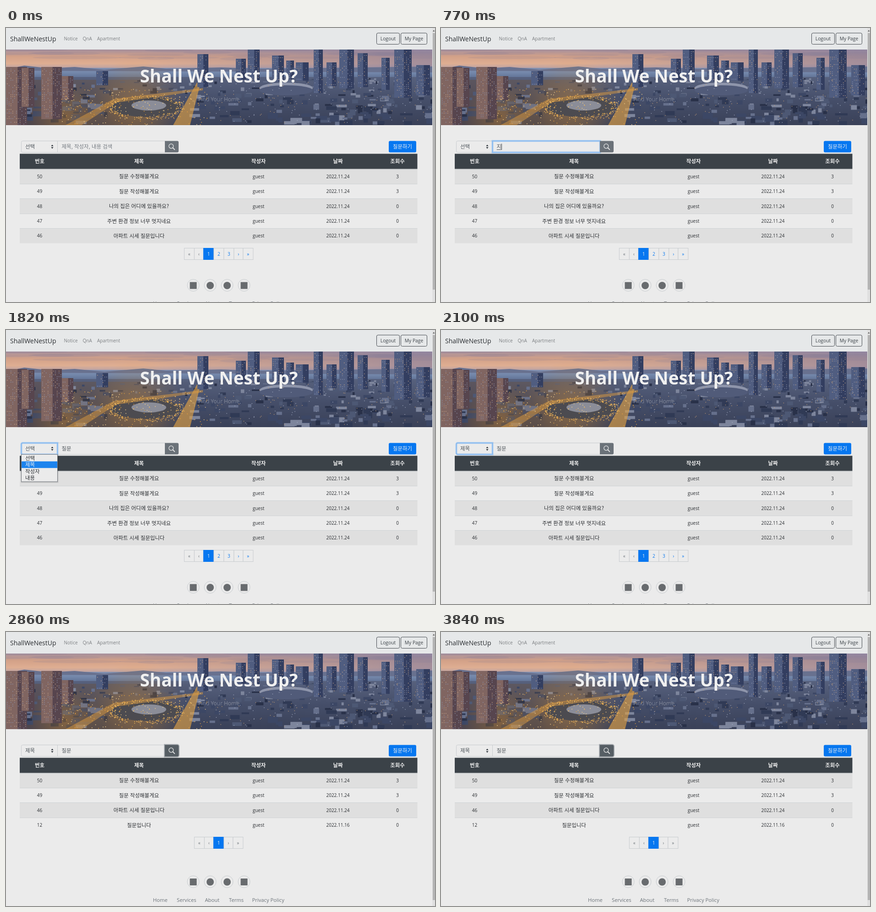
An HTML page with a canvas for the animation above (3910 ms loop, 937 px wide and 598 px high).

```html
<!DOCTYPE html>
<html lang="ko">
<head>
<meta charset="utf-8">
<title>Question board</title>
<style>
html, body { margin: 0; width: 100%; height: 100%; overflow: hidden; background: #ebebeb; }
canvas, svg { position: absolute; left: 0; top: 0; display: block; }
canvas { top: 47px; }
text { font-family: "Open Sans", "Noto Sans", sans-serif; white-space: pre; }
text.ko { font-family: "Noto Sans CJK KR", "Noto Sans CJK", sans-serif; }
</style>
</head>
<body>
<canvas id="photo" width="931" height="165"></canvas>
<svg id="ui" width="937" height="598" viewBox="0 0 937 598"></svg>
<script>
const LOOP = 3910;
const BLUE = '#0677f0', INK = '#2a2d31', GRAY = '#6c7379', PAGE = '#ebebeb', LINE = '#c8cccf';
const ui = document.getElementById('ui');

function add(parent, tag, attrs, content) {
  const el = document.createElementNS('http://www.w3.org/2000/svg', tag);
  for (const k in attrs) el.setAttribute(k, attrs[k]);
  if (content !== undefined) el.textContent = content;
  return parent.appendChild(el);
}
const group = (parent = ui) => add(parent, 'g', {});
const rect = (p, x, y, width, height, fill, more) =>
  add(p, 'rect', { x, y, width, height, fill, ...more });
const path = (p, d, more) => add(p, 'path', { d, ...more });
// y is the optical middle of the line
const latin = (p, s, x, y, size, fill, more) =>
  add(p, 'text', { x, y: y + size * 0.36, 'font-size': size, fill, ...more }, s);
const korean = (p, s, x, y, fill, more) =>
  add(p, 'text', { class: 'ko', x, y: y + 4.3, 'font-size': 11.45, fill, ...more }, s);
const MID = { 'text-anchor': 'middle' };
const show = (el, on) => el.setAttribute('visibility', on ? 'inherit' : 'hidden');

function paintPhoto() {
  const c = document.getElementById('photo').getContext('2d');
  let seed = 11;
  const rnd = (a = 0, b = 1) => {
    seed = (seed * 16807) % 2147483647;
    return a + (b - a) * seed / 2147483647;
  };
  const fill = (style, x, y, w, h) => { c.fillStyle = style; c.fillRect(x, y, w, h); };
  const ramp = (x0, y0, x1, y1, colors) => {
    const g = c.createLinearGradient(x0, y0, x1, y1);
    colors.forEach((col, i) => g.addColorStop(i / (colors.length - 1), col));
    return g;
  };
  const shape = (style, pts) => {
    c.fillStyle = style;
    c.beginPath();
    for (let i = 0; i < pts.length; i += 2) c.lineTo(pts[i], pts[i + 1]);
    c.fill();
  };
  const oval = (style, x, y, rx, ry) => {
    c.fillStyle = style;
    c.beginPath();
    c.ellipse(x, y, rx, ry, 0, 0, 7);
    c.fill();
  };
  const glow = (x, y, r, rgb, a) => {
    const g = c.createRadialGradient(x, y, 0, x, y, r);
    g.addColorStop(0, `rgba(${rgb},${a})`);
    g.addColorStop(1, `rgba(${rgb},0)`);
    fill(g, x - r, y - r, 2 * r, 2 * r);
  };

  // sky, sea and ground
  fill(ramp(0, 0, 0, 46, ['#a58f9c', '#d3a188', '#dfae92', '#a99dae']), 0, 0, 931, 48);
  fill(ramp(300, 0, 931, 0, ['rgba(132,126,160,0)', 'rgba(132,126,160,.65)']), 0, 0, 931, 48);
  for (let i = 0; i < 22; i++) oval('rgba(122,117,150,.16)', rnd(0, 931), rnd(0, 22), rnd(40, 100), rnd(2, 4));
  fill(ramp(0, 38, 0, 64, ['#8591b0', '#7387aa', '#5d6e91']), 0, 40, 931, 30);
  shape('#68718f', [0, 43, 40, 35, 95, 41, 150, 38, 215, 44, 300, 37, 350, 42, 470, 39, 560, 42, 931, 37, 931, 50, 0, 46]);
  fill(ramp(0, 58, 0, 165, ['#58627e', '#454e69', '#3a4158']), 0, 60, 931, 105);
  fill(ramp(0, 0, 460, 0, ['rgba(95,72,65,.5)', 'rgba(110,80,52,.35)', 'rgba(60,72,110,0)']), 0, 66, 460, 99);

  // low blocks
  const tones = ['#303a55', '#3c4765', '#4d5874', '#66708c', '#7d859c', '#293149'];
  for (let i = 0; i < 330; i++) {
    const y = rnd(62, 158), k = y / 110, x = rnd(-10, 931);
    if (x > 215 && x < 400 && y > 92) continue;
    fill(tones[Math.floor(rnd(0, 6))], x, y, rnd(5, 22) * k, rnd(3, 11) * k);
  }

  // park, pond and lit roads
  glow(285, 125, 105, '214,143,50', 0.45);
  glow(130, 150, 80, '220,145,45', 0.35);
  oval('#4c4b50', 305, 125, 75, 22);
  oval('#8b8d98', 312, 122, 38, 11);
  shape('rgba(222,160,72,.65)', [417, 72, 425, 72, 402, 165, 365, 165]);
  shape('rgba(218,154,66,.5)', [130, 165, 235, 108, 430, 84, 430, 89, 240, 116, 165, 165]);
  oval('#8e95ab', 612, 84, 58, 12);
  oval('#515b79', 612, 89, 58, 11);

  // towers: left, top, width, bottom
  const towers = [0, 38, 46, 165, 34, 40, 28, 125, 77, 38, 45, 152, 122, 58, 25, 110, 197, 47, 26, 78,
    418, 10, 24, 82, 502, 20, 22, 66, 528, 0, 26, 70, 581, 13, 26, 70, 612, 24, 17, 65, 633, 28, 28, 68,
    672, 0, 20, 95, 700, 28, 22, 80, 728, 0, 32, 85, 768, 8, 22, 82, 820, 18, 18, 88, 848, 0, 38, 105, 896, 34, 30, 100];
  for (let i = 0; i < towers.length; i += 4) {
    const [x, y, w, b] = towers.slice(i, i + 4), warm = x < 150;
    fill(warm ? '#806561' : '#505d80', x, y, w, b - y);
    fill(warm ? '#57454e' : '#333e60', x + w * 0.55, y, w * 0.45, b - y);
    for (let v = y + 4; v < b - 2; v += 4)
      for (let u = x + 2; u < x + w - 2; u += 4)
        if (rnd() < 0.4) fill(rnd() < 0.4 ? '#c9a88c' : '#8f96ad', u, v, 1.5, 1.3);
  }

  // lamps
  for (let i = 0; i < 230; i++) {
    const a = rnd(0, 6.283);
    fill('#efb65a', 305 + Math.cos(a) * 76 + rnd(-9, 9), 126 + Math.sin(a) * 23 + rnd(-4, 4), 1.7, 1.5);
  }
  for (let i = 0; i < 240; i++) {
    const x = 120 + 320 * rnd() ** 1.2;
    fill(rnd() < 0.6 ? '#e2a03f' : '#f3cf8c', x, rnd(85, 164), 1.6, 1.5);
  }
  for (let i = 0; i < 170; i++) fill(rnd() < 0.5 ? '#cfa576' : '#aeb6cb', rnd(430, 931), rnd(64, 160), 1.4, 1.2);
}

function pager(parent, y, labels, widths, current, links) {
  let x = 464.6 - widths.reduce((a, b) => a + b) / 2;
  labels.forEach((s, i) => {
    const w = widths[i], on = i === current;
    rect(parent, x, y, w, 25, on ? BLUE : PAGE, { stroke: on ? BLUE : LINE });
    latin(parent, s, x + w / 2, y + 12.5, 10, on ? '#f0f0f0' : i > current && links ? BLUE : GRAY, MID);
    x += w;
  });
}

function board(rows, pages) {
  const g = group();
  const columns = [73.5, 290.5, 551.5, 725, 855];
  rows.forEach(([no, title, day, views], i) => {
    const y = 307.5 + 32.45 * i, mid = y + 16.5;
    if (i % 2 === 0) rect(g, 30, y, 868.5, 32.45, '#dfdfdf');
    rect(g, 30, Math.round(y), 868.5, 1, '#cfd2d4');
    [no, title, 'guest', '2022.11.24'.slice(0, 8) + day, views].forEach((s, c) =>
      c === 1 ? korean(g, s, columns[c], mid, INK, MID) : latin(g, s, columns[c], mid, 10, INK, MID));
  });
  rect(g, 30, 274.5, 868.5, 33, '#3b4248');
  ['번호', '제목', '작성자', '날짜', '조회수'].forEach((s, c) =>
    korean(g, s, columns[c], 291, '#eeeeee', { ...MID, 'font-weight': 700 }));

  const end = rows.length === 5;
  const y = end ? 480.5 : 447.5;
  if (end) pager(g, y, ['«', '‹', '1', '2', '3', '›', '»'], [22, 20, 22.5, 22, 22, 20, 22], 2, true);
  else pager(g, y, ['«', '‹', '1', '›', '»'], [22, 20, 22.5, 20, 22], 2, false);

  const foot = end ? 562 : 545.5;
  [409, 446, 483, 520].forEach((cx, i) => {
    add(g, 'circle', { cx, cy: foot - 0.5, r: 13, fill: 'none', stroke: LINE });
    if (i % 3) add(g, 'circle', { cx, cy: foot, r: 8, fill: '#686b6e' });
    else rect(g, cx - 7.5, foot - 7.5, 15, 15, '#686b6e');
  });
  [['Home', 321], ['Services', 373], ['About', 434.5], ['Terms', 487], ['Privacy Policy', 537.5]].forEach(([s, x]) =>
    latin(g, s, x, foot + 39, 11.25, GRAY));
  rect(g, 932, 11, 5, end ? 560 : 574, '#b4b4b4');
  return g;
}

function buildHeader() {
  rect(ui, 0, 0, 931, 47, '#e6e8e9');
  rect(ui, 931, 0, 6, 598, '#e0e0e0');
  path(ui, 'M932 7.5h4.5l-2.2-3z', { fill: '#555' });
  latin(ui, 'ShallWeNestUp', 9, 23.5, 14, INK);
  [['Notice', 126.5], ['QnA', 167.5], ['Apartment', 199]].forEach(([s, x]) => latin(ui, s, x, 23.5, 10, '#7c7f82'));
  [['Logout', 809.5, 50], ['My Page', 862.5, 57]].forEach(([s, x, w]) => {
    rect(ui, x, 11, w, 24.5, 'none', { rx: 3, stroke: '#454a50' });
    latin(ui, s, x + w / 2, 23.5, 10.3, '#3a4046', MID);
  });
  latin(ui, 'Shall We Nest Up?', 465, 105.5, 38.6, '#f0f0f0', { ...MID, 'font-weight': 700 });
  latin(ui, 'Find Your Home', 465, 156, 12, 'rgba(240,240,240,.38)', MID);
}

const OPTIONS = ['선택', '제목', '작성자', '내용'];
const SELECT = 'M112.5 246.5H36.5a3 3 0 0 0-3 3v19a3 3 0 0 0 3 3h76z';
const INPUT = 'M112.5 246.5h235v25h-235z';
const SEARCH = 'M347 246.5h27a3 3 0 0 1 3 3v19a3 3 0 0 1-3 3h-27z';

function ring(d, edge, halo) {
  const g = group();
  path(g, d, { fill: 'none', stroke: halo, 'stroke-width': 4 });
  path(g, d, { fill: 'none', stroke: edge });
  return g;
}

paintPhoto();
buildHeader();
const full = board([
  ['50', '질문 수정해볼게요', '24', '3'],
  ['49', '질문 작성해볼게요', '24', '3'],
  ['48', '나의 집은 어디에 있을까요?', '24', '0'],
  ['47', '주변 환경 정보 너무 멋지네요', '24', '0'],
  ['46', '아파트 시세 질문입니다', '24', '0']]);
const found = board([
  ['50', '질문 수정해볼게요', '24', '3'],
  ['49', '질문 작성해볼게요', '24', '3'],
  ['46', '아파트 시세 질문입니다', '24', '0'],
  ['12', '질문입니다', '16', '0']]);

path(ui, SELECT, { fill: PAGE, stroke: LINE });
path(ui, INPUT, { fill: PAGE, stroke: LINE });
const rings = {
  input: ring(INPUT, '#78b0ec', 'rgba(0,123,255,.28)'),
  select: ring(SELECT, '#78b0ec', 'rgba(0,123,255,.28)'),
  search: ring(SEARCH, '#8b9197', 'rgba(108,117,125,.5)')
};
const button = path(ui, SEARCH, {});
add(ui, 'circle', { cx: 360.7, cy: 257.8, r: 4.9, fill: 'none', stroke: '#eeeeee', 'stroke-width': 1.2 });
path(ui, 'M364.3 261.4l4 4', { stroke: '#eeeeee', 'stroke-width': 1.7, 'stroke-linecap': 'round' });
const choice = korean(ui, '', 42, 259, '#4c5359');
path(ui, 'M98.4 258h5.2l-2.6-3.5zM98.4 260h5.2l-2.6 3.5z', { fill: '#343a40' });
const query = korean(ui, '', 121.5, 259, '');
const underline = rect(ui, 0, 265, 10, 1, '#4c5359');
const caret = rect(ui, 0, 252.5, 1, 13.5, '#3a4046');
rect(ui, 836, 246.5, 60, 25, BLUE, { rx: 3 });
korean(ui, '질문하기', 866, 259, '#f0f0f0', MID);

const menu = group();
rect(menu, 32.5, 272, 82, 61.5, 'rgba(0,0,0,.12)');
rect(menu, 33.5, 271.5, 79, 59.5, PAGE, { stroke: '#73787e' });
const marker = rect(menu, 34, 0, 78, 14.5, '#1c83ee');
const items = OPTIONS.map((s, i) => korean(menu, s, 42, 279.6 + 14.5 * i, INK));

// each step changes part of the state from its time on
const STEPS = [
  [0, { focus: '', text: '', typing: false, caret: false, pick: 0, hover: -1, done: false }],
  [280, { focus: 'input', caret: true }],
  [630, { text: 'ㅈ', typing: true }],
  [700, { text: '지' }],
  [840, { text: '질' }],
  [910, { text: '질ㅁ' }],
  [980, { text: '질무' }],
  [1050, { text: '질문' }],
  [1330, { caret: false }],
  [1610, { focus: 'select', typing: false, hover: 0 }],
  [1750, { hover: 1 }],
  [2100, { hover: -1, pick: 1 }],
  [2240, { focus: '' }],
  [2660, { focus: 'search' }],
  [2800, { done: true }]
];

function draw(t) {
  const s = {};
  for (const [at, change] of STEPS) if (at <= t) Object.assign(s, change);
  show(full, !s.done);
  show(found, s.done);
  for (const k in rings) show(rings[k], s.focus === k);
  button.setAttribute('fill', s.focus === 'search' ? '#565e64' : '#6b7279');
  choice.textContent = OPTIONS[s.pick];
  query.textContent = s.text || '제목, 작성자, 내용 검색';
  query.setAttribute('fill', s.text ? '#4c5359' : '#747a80');
  const end = 121.5 + s.text.length * 10.5;
  underline.setAttribute('x', end - 10.3);
  show(underline, s.typing);
  caret.setAttribute('x', Math.round(end - 0.5));
  show(caret, s.caret);
  show(menu, s.hover >= 0);
  marker.setAttribute('y', 272.2 + 14.5 * Math.max(0, s.hover));
  items.forEach((el, i) => el.setAttribute('fill', i === s.hover ? '#f0f0f0' : INK));
}

const start = performance.now();
function tick() {
  draw((performance.now() - start) % LOOP);
  requestAnimationFrame(tick);
}
tick();
</script>
</body>
</html>
```
